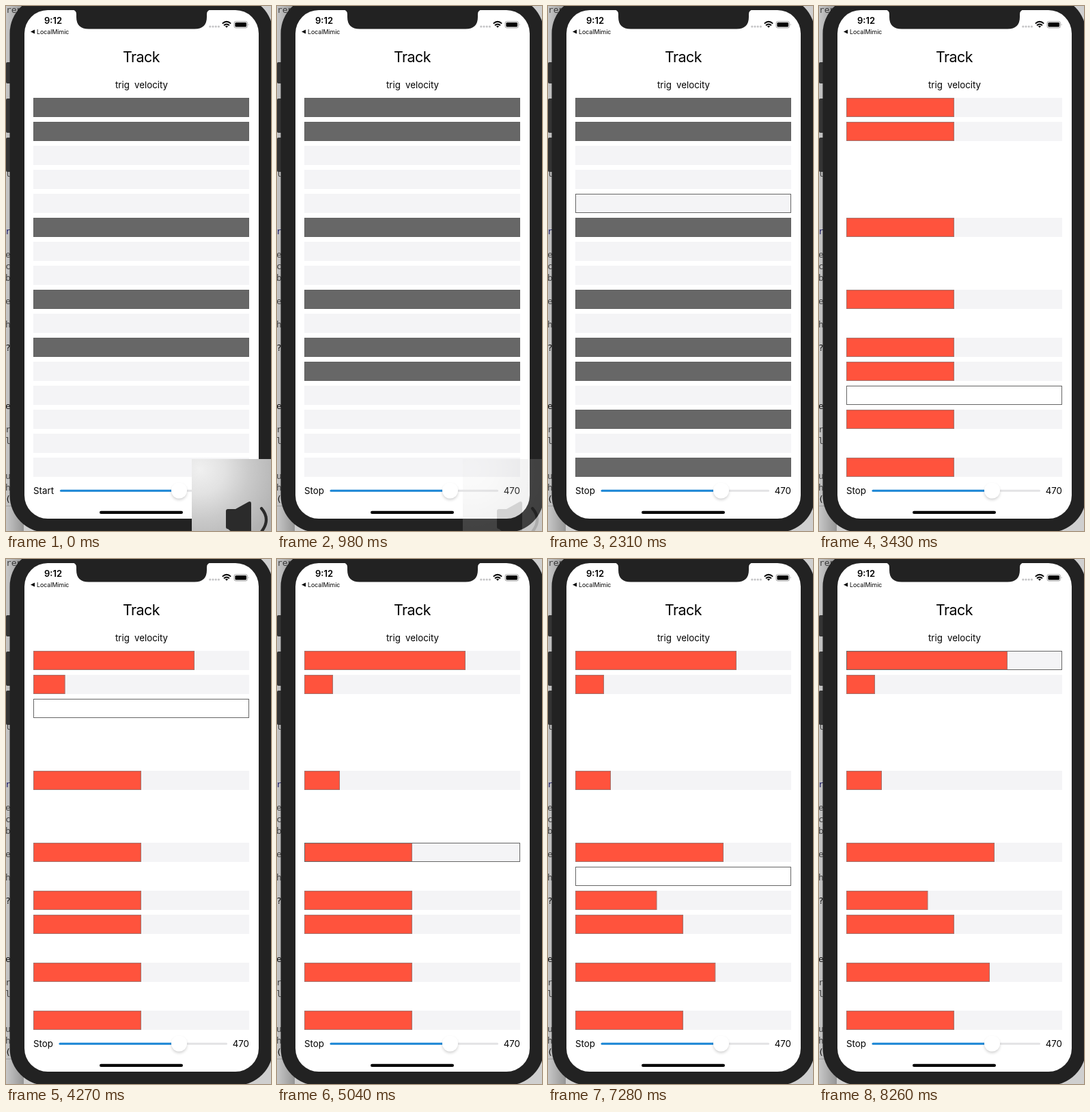
An HTML page that plays this animation: 388 by 766 pixels, repeating every 8.33 s.

```html
<!DOCTYPE html>
<html lang="en">
<head>
<meta charset="utf-8">
<title>Track sequencer</title>
<style>
  html, body { margin: 0; width: 100%; height: 100%; overflow: hidden; background: #c4c4c4; }
  svg { display: block; width: 388px; height: 766px; }
  text { font-family: Inter, Roboto, "Liberation Sans", sans-serif; font-size: 13.3px; fill: #000; }
  .code text { font: 13px "DejaVu Sans Mono", "Liberation Mono", monospace; fill: #444; }
</style>
</head>
<body>
<svg id="stage" viewBox="0 0 388 766">
  <defs>
    <linearGradient id="shade">
      <stop offset="0" stop-color="#000" stop-opacity=".04"/>
      <stop offset="1" stop-color="#000" stop-opacity=".28"/>
    </linearGradient>
    <radialGradient id="glass" gradientUnits="userSpaceOnUse" cx="284" cy="676" r="120">
      <stop offset="0" stop-color="#f0f0f0"/>
      <stop offset=".3" stop-color="#e2e2e2"/>
      <stop offset=".6" stop-color="#cacaca"/>
      <stop offset="1" stop-color="#b2b2b2"/>
    </radialGradient>
    <filter id="soft" x="-50%" y="-50%" width="200%" height="200%">
      <feGaussianBlur stdDeviation="2.2"/>
    </filter>
  </defs>

  <!-- editor behind the phone -->
  <rect width="388" height="766" fill="#cfcfcf"/>
  <path d="M0 729.5H40" stroke="#aaa"/>
  <g class="code" id="code"></g>
  <rect width="26" height="766" fill="url(#shade)"/>

  <!-- phone -->
  <g fill="#343434">
    <rect x="0" y="82" width="8" height="31" rx="2"/>
    <rect x="0" y="135" width="8" height="50" rx="2"/>
    <rect x="0" y="192" width="8" height="50" rx="2"/>
  </g>
  <rect x="5.5" y="-14" width="385.5" height="782" rx="54" fill="#222"/>
  <rect x="27" y="6" width="343" height="742" rx="34" fill="#fff"/>
  <path d="M97 5.5Q103 6 103 12V16Q103 33.5 121 33.5H276Q294 33.5 294 16V12Q294 6 300 5.5Z" fill="#222"/>

  <!-- status bar -->
  <text x="56" y="26" style="font-size:13px;font-weight:600">9:12</text>
  <path d="M36 37.5L42 34.5V40.5Z"/>
  <text x="45" y="41" style="font-size:8.8px">LocalMimic</text>
  <g fill="#c4c4c6">
    <circle cx="298.8" cy="30" r="1.6"/><circle cx="303" cy="30" r="1.6"/>
    <circle cx="307.2" cy="30" r="1.6"/><circle cx="311.4" cy="30" r="1.6"/>
  </g>
  <g fill="none" stroke="#000" stroke-width="1.9">
    <path d="M316.8 25.6Q323 19.8 329.2 25.6"/>
    <path d="M319 28.2Q323 24.6 327 28.2"/>
  </g>
  <path d="M320.9 29.6Q323 27.8 325.1 29.6L323 31.8Z"/>
  <rect x="334" y="22.5" width="19.5" height="9.5" rx="2.6" fill="#fff" stroke="#999" stroke-width=".9"/>
  <rect x="335.4" y="23.9" width="16.7" height="6.7" rx="1.5"/>
  <path d="M354.8 25.6Q356.4 27.2 354.8 28.8Z" fill="#999"/>

  <!-- page -->
  <text x="198" y="82" text-anchor="middle" style="font-size:21.4px;letter-spacing:-.5px">Track</text>
  <text x="160" y="120">trig</text>
  <text x="188" y="120">velocity</text>
  <g id="rows"></g>

  <text id="play" x="40" y="711.5">Start</text>
  <rect id="rail" y="705.8" height="3" rx="1.5" fill="#e3e3e5"/>
  <rect id="fill" y="705.8" height="3" rx="1.5" fill="#1b87d6"/>
  <circle cx="253.5" cy="709.5" r="11" opacity=".2" filter="url(#soft)"/>
  <circle cx="253.5" cy="707" r="11.5" fill="#fff"/>
  <text x="356" y="711.5" text-anchor="end">470</text>
  <rect x="137" y="736.8" width="122" height="4.2" rx="2.1"/>

  <!-- volume panel -->
  <g id="panel">
    <rect x="272" y="661" width="116" height="105" fill="url(#glass)"/>
    <path d="M325 734H336L355 723.5Q359 722 359 726V772H336L325 763Q322 763 322 760V737Q322 734 325 734Z" fill="#2b2b2b"/>
    <path d="M374 733Q388 749 374 767" fill="none" stroke="#2b2b2b" stroke-width="4.2" stroke-linecap="round"/>
  </g>
</svg>
<script>
const LOOP = 8330, TICK = 70;
const LEFT = 40, TOP = 134, WIDE = 316, TALL = 28, PITCH = 35;
const $ = id => document.getElementById(id);

function add(parent, tag, attrs) {
  const el = document.createElementNS("http://www.w3.org/2000/svg", tag);
  set(el, attrs);
  return parent.appendChild(el);
}
function set(el, attrs) {
  for (const k in attrs) el.setAttribute(k, attrs[k]);
}

// visible edge of the code lines
[["ren", 10], ["l", 249], ["r", 333, "#1c1c6e"], ["e", 367], ["c", 384], ["b", 401],
 ["e", 435], ["h", 469], ["?", 503, "#111"], ["e", 588, "#111"], ["r", 622], ["l", 639],
 ["u", 690], ["h", 707], ["(", 724, "#111"]].forEach(([s, y, color]) => {
  const el = add($("code"), "text", { x: s.length > 1 ? 0 : -1, y });
  el.textContent = s;
  if (color) el.style.fill = color;
});

// row -> tick at which it is switched on
const onAt = { 0: 0, 1: 0, 5: 0, 8: 0, 10: 0, 11: 11, 13: 19, 15: 25 };
// row -> [first tick, last tick, final width]
const drags = {
  0: [52, 56, 236], 1: [58, 62, 42], 5: [66, 70, 52],
  8: [74, 80, 217], 10: [87, 89.5, 119.5], 13: [98, 107, 210]
};
const START = 4, FIRST_ROW = 5, VELOCITY = 38;
// the playhead moves every second tick, apart from these gaps
const gaps = { 24: 4, 28: 1, 29: 1, 30: 1, 49: 1, 72: 1, 79: 1, 84: 3, 89: 1 };
const beats = [];
for (let k = START; k < LOOP / TICK; k += gaps[k] || 2) beats.push(k);

const rows = Array.from({ length: 16 }, (_, i) => {
  const y = TOP + PITCH * i;
  return {
    back: add($("rows"), "rect", { x: LEFT, y, width: WIDE, height: TALL }),
    bar: add($("rows"), "rect", { x: LEFT + .5, y: y + .5, height: TALL - 1 }),
    edge: add($("rows"), "rect", {
      x: LEFT + .5, y: y + .5, width: WIDE - 1, height: TALL - 1, fill: "none", stroke: "#666"
    })
  };
});

function level(i, k) {
  const d = drags[i];
  if (!d) return WIDE / 2;
  const p = Math.min(1, Math.max(0, (k - d[0] + 1) / (d[1] - d[0] + 1)));
  return WIDE / 2 + (d[2] - WIDE / 2) * p * (2 - p);
}

function draw(k) {
  const playing = k >= START, velocity = k >= VELOCITY;
  const count = beats.filter(b => b <= k).length;
  const head = count ? (FIRST_ROW + count - 1) % 16 : -1;

  rows.forEach((row, i) => {
    const on = i in onAt && k >= onAt[i];
    set(row.back, { fill: velocity && !on ? "#fff" : "#f4f4f6" });
    set(row.bar, {
      visibility: on ? "visible" : "hidden",
      width: (velocity ? level(i, k) : WIDE) - 1,
      fill: velocity ? "#ff533d" : "#676767",
      stroke: velocity ? "#a5706a" : "#626262"
    });
    set(row.edge, { visibility: i === head ? "visible" : "hidden" });
  });

  const x = playing ? 77.5 : 79;
  $("play").textContent = playing ? "Stop" : "Start";
  set($("rail"), { x, width: 324 - x });
  set($("fill"), { x, width: 253 - x });
  set($("panel"), { opacity: Math.min(1, Math.max(0, (16 - k) / 10)) });
}

let last = -1;
function loop() {
  const k = Math.floor(performance.now() % LOOP / TICK);
  if (k !== last) draw(last = k);
  requestAnimationFrame(loop);
}
loop();
</script>
</body>
</html>
```
